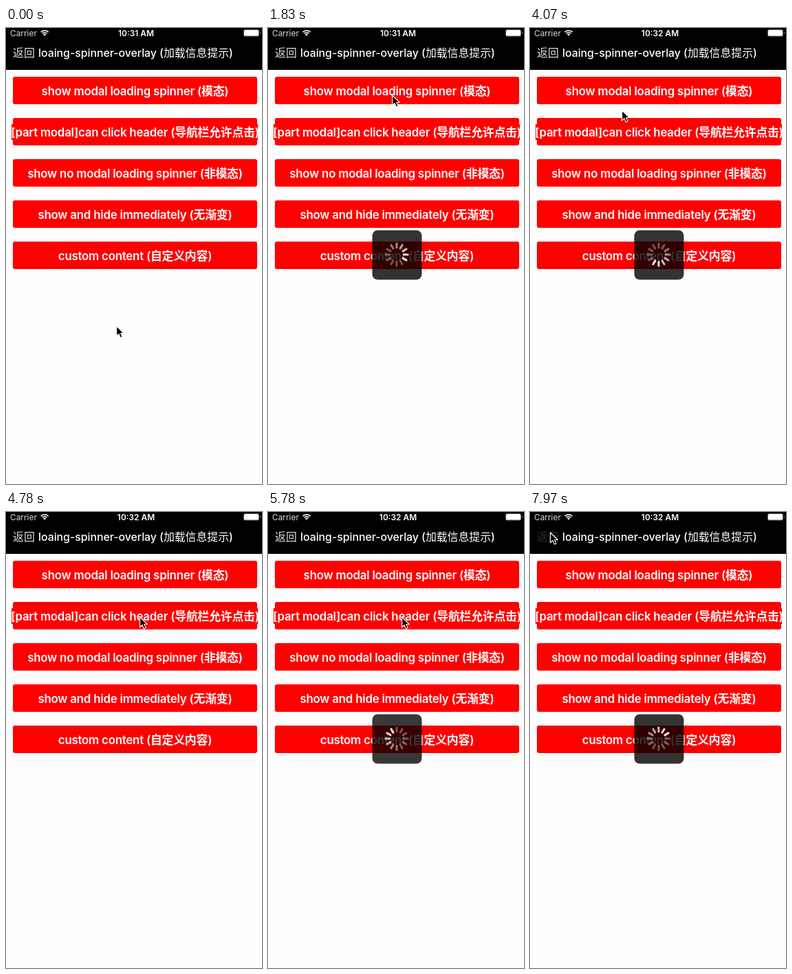
An HTML page for the animation above (8 s loop, 372x664 px).

```html
<!DOCTYPE html>
<html lang="zh-CN">
<head>
<meta charset="utf-8">
<style>
html, body { margin: 0; width: 100%; height: 100%; overflow: hidden; background: #fefefe; }
svg { display: block; width: 372px; height: 664px; }
text { font-family: Inter, "Noto Sans CJK SC", "Noto Sans CJK", sans-serif; fill: #fff; white-space: pre; }
.status { font-size: 11.9px; }
.title { font-size: 15.9px; font-weight: 500; letter-spacing: -.05px; }
.label text { font-size: 16.86px; font-weight: 600; letter-spacing: -.23px; text-anchor: middle; }
</style>
</head>
<body>
<svg viewBox="0 0 372 664">
  <rect width="372" height="61"/>
  <text class="status" x="6" y="11.5" fill-opacity=".85">Carrier</text>
  <g fill="none" stroke="#fff" stroke-width="1.6">
    <path d="M50.6 5.9a8 8 0 0 1 11 0M52.6 8a5.2 5.2 0 0 1 7 0"/>
    <path d="M56.1 11.5L54 9.3a3 3 0 0 1 4.2 0z" fill="#fff" stroke="none"/>
  </g>
  <text id="clock" class="status" x="189" y="11.5" font-weight="600" text-anchor="middle"></text>
  <rect x="345.5" y="2.5" width="22" height="9.5" rx="2" fill="none" stroke="#fff" stroke-opacity=".4"/>
  <rect x="346" y="3" width="21" height="8.5" rx="1.5" fill="#fff"/>
  <path d="M369 5.3q1.6 2 0 4z" fill="#fff"/>
  <text id="back" x="10" y="41.5" font-size="15.9" fill-opacity=".88">返回</text>
  <text class="title" x="47" y="41.5">loaing-spinner-overlay (加载信息提示)</text>
  <g id="buttons"></g>
  <g id="overlay">
    <rect x="151.5" y="294.5" width="72" height="72" rx="8" fill-opacity=".8"/>
    <g id="petals" transform="translate(187 330)" stroke="#fff" stroke-width="3" stroke-linecap="round"></g>
  </g>
  <path id="cursor" d="M.7 1V15.6L4 12.5 6.4 18 9 16.9 6.7 11.5H11.2z" stroke="#fff" stroke-width="1.1" stroke-linejoin="round"/>
</svg>
<script>
const $ = id => document.getElementById(id);
const labels = [
  'show modal loading spinner (模态)',
  '[part modal]can click header (导航栏允许点击)',
  'show no modal loading spinner (非模态)',
  'show and hide immediately (无渐变)',
  'custom content (自定义内容)'
];
$('buttons').innerHTML = labels.map((label, i) => `
  <rect x="10" y="${71 + 60 * i}" width="355" height="40" rx="3" fill="#f00"/>
  <g class="label">
    ${i === 1 ? '<rect x="8" y="140" width="358" height="23" fill="#f00"/>' : ''}
    <text x="187.5" y="${97.5 + 60 * i}">${label}</text>
  </g>`).join('');
$('petals').innerHTML = Array.from({ length: 12 }, (_, i) =>
  `<path d="M0 -10.3V-16.2" transform="rotate(${30 * i})"/>`).join('');

const buttonLabels = document.querySelectorAll('.label');
const petals = $('petals').children;

// time, x, y
const track = [
  [240, 160, 433], [940, 180, 97], [1890, 180, 97], [2560, 28, 33],
  [3240, 28, 32], [3620, 133, 119], [4610, 133, 119], [4780, 194, 152],
  [6450, 194, 152], [6700, 154, 105], [7000, 67, 76], [7260, 67, 76], [7600, 29, 29]
];

const clamp = v => Math.max(0, Math.min(1, v));
const smooth = v => v * v * (3 - 2 * v);
const ramp = (t, start, length) => smooth(clamp((t - start) / length));

function cursorAt(t) {
  const next = track.findIndex(key => key[0] > t);
  if (next === 0) return track[0].slice(1);
  if (next < 0) return track.at(-1).slice(1);
  const [t0, x0, y0] = track[next - 1], [t1, x1, y1] = track[next];
  const k = smooth((t - t0) / (t1 - t0));
  return [x0 + (x1 - x0) * k, y0 + (y1 - y0) * k];
}

const pressed = (t, down, up) => t < down ? 1 : .2 + .8 * ramp(t, up, 170);

function draw(t) {
  $('clock').textContent = t < 3900 ? '10:31 AM' : '10:32 AM';
  $('cursor').setAttribute('transform', `translate(${cursorAt(t)})`);
  buttonLabels[0].style.opacity = pressed(t, 990, 1250);
  buttonLabels[1].style.opacity = pressed(t, 5260, 5590);
  $('back').style.opacity = t < 7920 ? 1 : .2;
  $('overlay').style.opacity = ramp(t, 1190, 250) - ramp(t, 4190, 250) + ramp(t, 5555, 250);

  const head = Math.floor(t * .012 + (t < 5000 ? 6.6 : 2.6));
  for (let i = 0; i < 12; i++) {
    const age = (head - i + 120) % 12;
    petals[i].style.opacity = Math.max(.33, .95 - age * .1);
  }
}

function frame(now) {
  draw(now % 8000);
  requestAnimationFrame(frame);
}
requestAnimationFrame(frame);
</script>
</body>
</html>
```
